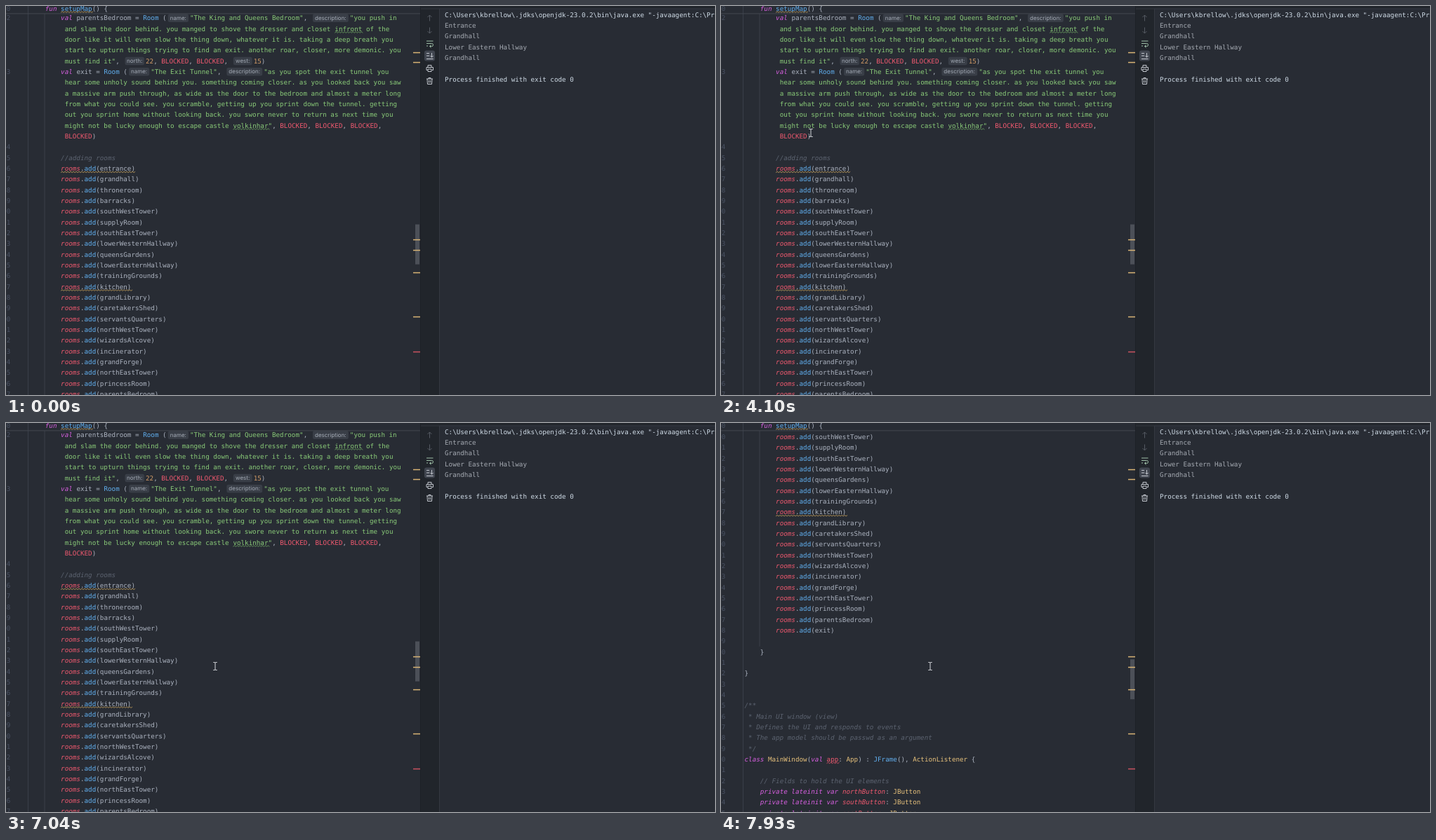
Animation, 1010 px wide and 555 px high, one loop 8 s. Source, as an HTML page:

```html
<!DOCTYPE html>
<html lang="en">
<head>
<meta charset="utf-8">
<title>Code editor and console</title>
<style>
  html, body { margin: 0; width: 100%; height: 100%; overflow: hidden; background: #282c34; }
  svg { display: block; width: 1010px; height: 555px; }
  text { white-space: pre; text-rendering: geometricPrecision; font: 9.26px "DejaVu Sans Mono", monospace; }
  .i { font-style: italic; }
  .hint { font: 8px Inter, sans-serif; }
</style>
</head>
<body>
<svg viewBox="0 0 1010 555">
  <defs><clipPath id="pane"><rect y="11" width="590" height="544"/></clipPath></defs>
  <rect width="1010" height="555" fill="#282c34"/>
  <path d="M31.5 0V555" stroke="#3a3f49"/>
  <g clip-path="url(#pane)"><g id="code"></g></g>
  <g id="head"><path d="M0 10.9H590" stroke="#42474f"/></g>
  <rect id="thumb" x="583" width="6" height="57" fill="#4c5058"/>
  <g id="marks"></g>
  <rect x="590" width="27" height="555" fill="#21252b"/>
  <rect x="590" width="420" height="3.5" fill="#21252b"/>
  <path d="M590 4H1010M617.5 4V555" stroke="#343941" fill="none"/>
  <path d="M590.5 0V555" stroke="#1d2026"/>
  <rect x="596" y="63.5" width="15" height="15" rx="3" fill="#414650"/>
  <g fill="none" stroke="#c3c7ce" stroke-width="1">
    <path d="M603.5 21.5V13M600.5 16l3-3 3 3M603.5 30.500v8.500M600.500 36l3 3 3-3" stroke="#555a63"/>
    <path d="M599 50h9.500M599 53.500h7.500a2 2 0 0 1 0 4h-2.500M605.500 55.500l-2 2 2 2M599 57h2" stroke="#9fc0a8"/>
    <path d="M599 67.500h4M599 71h4M599 75.500h9.500M606.500 67v6M604.300 71l2.200 2.200 2.200-2.200"/>
    <path d="M601 87.500v-3h5v3M600.500 91.500h-1.500v-4h9.500v4h-1.500M601 90h5v3.500h-5z"/>
    <path d="M599 104h9M602 104v-1.500h3v1.500M600 104l.5 7.500h6l.5-7.500M602.500 106v3.500M604.700 106v3.500"/>
  </g>
  <g id="console"></g>
  <path id="cursor" d="M-2.700 -5.500H-1Q0 -5.500 0 -4.500Q0 -5.500 1 -5.500H2.700M0 -4.500V4.500M-2.700 5.500H-1Q0 5.500 0 4.500Q0 5.500 1 5.500H2.700" fill="none" stroke="#d3d6da"/>
</svg>
<script>
const $ = id => document.getElementById(id);
const CW = 5.575, ROW = 15.335, LEFT = 33.5;
const COLORS = { k: '#d55fde', s: '#89ca78', f: '#61afef', n: '#d19a66', t: '#e5c07b',
  r: '#ef596f', v: '#ef596f', c: '#5c6370', p: '#abb2bf' };
const WAVES = { s: '#6fa862', f: '#c9a45c', r: '#ef596f' };
const HINTS = { 'name:': 33.4, 'description:': 55, 'north:': 31.7, 'west:': 31 };

function add(parent, tag, attrs, text) {
  const el = document.createElementNS('http://www.w3.org/2000/svg', tag);
  for (const k in attrs) el.setAttribute(k, attrs[k]);
  if (text) el.textContent = text;
  parent.append(el);
  return el;
}

function wave(g, x, y, width, stroke) {
  let d = `M${x} ${y + 1}`;
  for (let i = 0; i < width / 2; i++) d += i % 2 ? 'l2 1.5' : 'l2 -1.5';
  add(g, 'path', { d, stroke, fill: 'none', 'stroke-width': .8 });
}

// Markup: [kind|text], with ~ after the kind for a wavy underline
function drawLine(g, x, mid, src) {
  for (const m of src.matchAll(/\[(\w)(~?)\|(.*?)\]|[^\[]+/g)) {
    const kind = m[1] || 'p', str = m[3] || m[0];
    if (kind === 'h') {
      const w = HINTS[str];
      add(g, 'rect', { x: x + 2.2, y: mid - 5.7, width: w - 4.2, height: 11.6, rx: 2.5, fill: '#393e47' });
      add(g, 'text', { x: x + w / 2, y: mid + 2.7, class: 'hint', fill: '#a4abb6', 'text-anchor': 'middle' }, str);
      x += w;
      continue;
    }
    add(g, 'text', { x, y: mid + 3.3, fill: COLORS[kind], class: 'kvc'.includes(kind) ? 'i' : '' }, str);
    const w = str.length * CW;
    if (m[2]) wave(g, x, mid + 5, w, WAVES[kind]);
    x += w;
  }
}

function lineNumber(g, mid, n) {
  add(g, 'text', { x: 6.3, y: mid + 3.3, fill: '#495162', 'text-anchor': 'end' }, n);
}

const rooms = ('entrance grandhall throneroom barracks southWestTower supplyRoom southEastTower ' +
  'lowerWesternHallway queensGardens lowerEasternHallway trainingGrounds kitchen grandLibrary ' +
  'caretakersShed servantsQuarters northWestTower wizardsAlcove incinerator grandForge ' +
  'northEastTower princessRoom parentsBedroom exit').split(' ');
const warned = ['entrance', 'kitchen'];
const field = name => `4 [k|private lateinit var] [v|${name}Button]: [t|JButton]`;

// Each entry starts with its column; "+" marks a soft-wrapped row
const lines = [
  '8 [k|val] parentsBedroom = [f|Room] ([h|name:][s|"The King and Queens Bedroom"], [h|description:][s|"you push in]',
  '+[s|and slam the door behind. you manged to shove the dresser and closet ][s~|infront][s| of the]',
  '+[s|door like it will even slow the thing down, whatever it is. taking a deep breath you]',
  '+[s|start to upturn things trying to find an exit. another roar, closer, more demonic. you]',
  '+[s|must find it"], [h|north:][n|22], [r|BLOCKED], [r|BLOCKED], [h|west:][n|15])',
  '8 [k|val] exit = [f|Room] ([h|name:][s|"The Exit Tunnel"], [h|description:][s|"as you spot the exit tunnel you]',
  '+[s|hear some unholy sound behind you. something coming closer. as you looked back you saw]',
  '+[s|a massive arm push through, as wide as the door to the bedroom and almost a meter long]',
  '+[s|from what you could see. you scramble, getting up you sprint down the tunnel. getting]',
  '+[s|out you sprint home without looking back. you swore never to return as next time you]',
  '+[s|might not be lucky enough to escape castle ][s~|volkinhar][s|"], [r|BLOCKED], [r|BLOCKED], [r|BLOCKED],',
  '+[r|BLOCKED])',
  '0 ',
  '8 [c|//adding rooms]',
  ...rooms.map(r => `8 [v|rooms].[f|add](${r})`),
  '0 ', '4 }', '0 ', '0 }', '0 ', '0 ',
  '0 [c|/**]',
  '1 [c|* Main UI window (view)]',
  '1 [c|* Defines the UI and responds to events]',
  '1 [c|* The app model should be passwd as an argument]',
  '1 [c|*/]',
  '0 [k|class] [t|MainWindow]([k|val] [r~|app]: [t|App]) : [f|JFrame](), [t|ActionListener] {',
  '0 ',
  '4 [c|// Fields to hold the UI elements]',
  ...['north', 'south', 'east', 'west'].map(field)
];

const code = $('code');
const rowY = i => 17 + i * ROW;
const bodyEnd = lines.indexOf('4 }');
add(code, 'path', { d: `M55 -10V${rowY(bodyEnd) - 7.5}`, stroke: '#3a3f49' });
let num = 182;
lines.forEach((line, i) => {
  const mid = rowY(i), wrapped = line[0] === '+';
  if (!wrapped) lineNumber(code, mid, num++);
  const col = wrapped ? 9 : +line[0], x = LEFT + col * CW;
  drawLine(code, x, mid, line.slice(wrapped ? 1 : 2));
  const name = warned.find(r => line.endsWith(`(${r})`));
  if (name) wave(code, x, mid + 5, (name.length + 11) * CW, WAVES.f);
});

lineNumber($('head'), 3.3, 160);
drawLine($('head'), LEFT + 4 * CW, 3.3, '[k|fun] [f~|setupMap]() {');

for (const y of [66, 80, 333, 348, 380, 443, 493])
  add($('marks'), 'rect', { x: 580, y: y - .2, width: 10, height: 1.5, fill: y > 490 ? '#c9525f' : '#d8b374' });

['C:\\Users\\kbrellow\\.jdks\\openjdk-23.0.2\\bin\\java.exe "-javaagent:C:\\Pr',
  'Entrance', 'Grandhall', 'Lower Eastern Hallway', 'Grandhall', '', 'Process finished with exit code 0'
].forEach((s, i) => add($('console'), 'text',
  { x: 625, y: 15.6 + i * ROW, fill: i % 6 ? '#a4a9b1' : '#cfdbe6' }, s));

// Pointer moves: start, end, step count, then [step, x, y] keys
const moves = [
  [930, 1130, 4, [1, 905, 509], [4, 516, 268]],
  [1330, 1880, 8, [0, 516, 268], [3, 440, 205], [8, 385.5, 167]],
  [2220, 2290, 2, [0, 385.5, 167], [2, 369, 169]],
  [2490, 2820, 5, [0, 369, 169], [3, 417, 170], [5, 535, 165]],
  [2960, 3760, 13, [0, 535, 165], [4, 400, 176], [9, 58, 222], [13, 84, 196]],
  [3900, 4320, 7, [0, 84, 196], [4, 128, 181], [7, 328, 157]],
  [4490, 5290, 13, [0, 328, 157], [8, 551, 168], [13, 533, 187]],
  [5370, 6170, 13, [0, 533, 188], [6, 310, 204], [11, 111, 200], [13, 59, 189]],
  [6300, 6710, 7, [0, 59, 189], [4, 447, 290], [7, 273, 356]],
  [7040, 7040, 1, [1, 298, 347]]
];
const scrolls = [[0, 0], [7380, 18], [7450, 73.3], [7520, 160], [7590, 242.7], [7660, 262], [7720, 270.5], [7930, 273.4]];

function pointer(t) {
  const move = moves.findLast(m => t >= m[0]);
  if (!move) return [-50, -50];
  const [start, end, count, ...keys] = move;
  const gap = (end - start) / (count - 1 || 1) || 1;
  const step = Math.min(count, 1 + Math.floor((t - start) / gap + .2));
  const j = keys.findIndex(k => k[0] >= step);
  const b = keys[j], a = keys[j - 1] || b;
  const u = a === b ? 0 : (step - a[0]) / (b[0] - a[0]);
  return [a[1] + (b[1] - a[1]) * u, a[2] + (b[2] - a[2]) * u];
}

function render(t) {
  const scroll = scrolls.findLast(s => t >= s[0])[1];
  code.setAttribute('transform', `translate(0 ${-scroll})`);
  $('thumb').setAttribute('y', 311.6 + scroll * .0935);
  const [x, y] = pointer(t);
  $('cursor').setAttribute('transform', `translate(${x} ${y})`);
}

const began = performance.now();
function frame() {
  render((performance.now() - began) % 8000);
  requestAnimationFrame(frame);
}
render(0);
requestAnimationFrame(frame);
</script>
</body>
</html>
```
